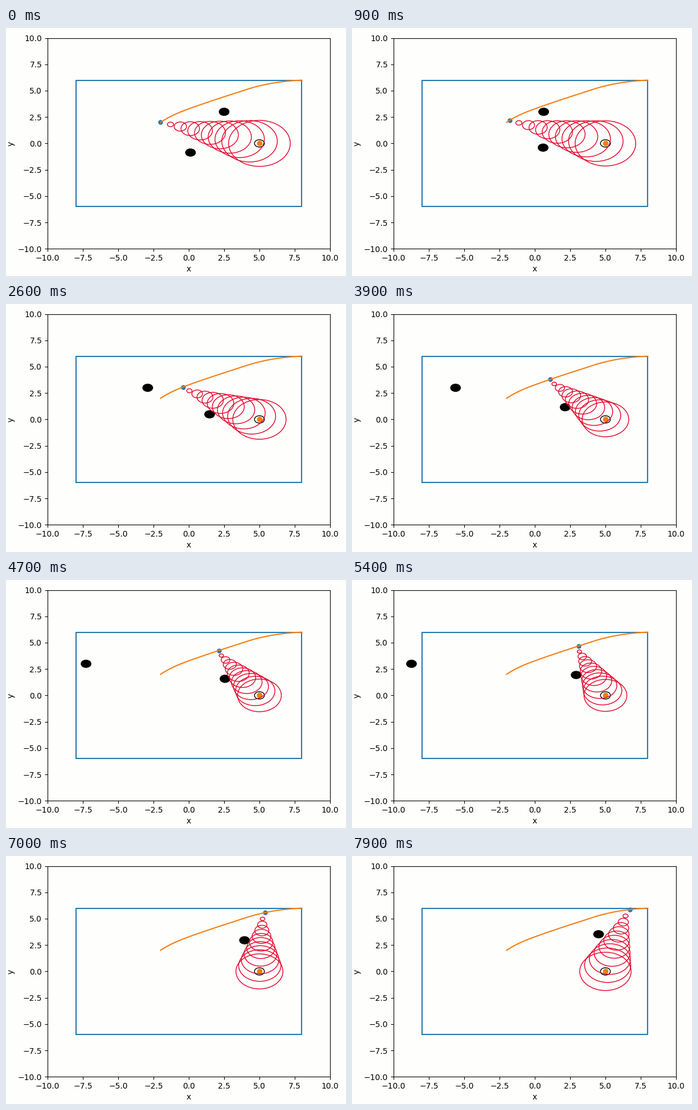
A matplotlib script for the animation above (8000 ms loop, 597 by 435 pixels).

```python
import numpy as np
import matplotlib.pyplot as plt
from matplotlib.animation import FuncAnimation
from matplotlib.patches import Circle

W, H, DPI = 597, 435, 100
FRAMES, INTERVAL = 80, 100
BLUE, ORANGE, RED, PAPER = "#2478ae", "#f57d12", "#e20024", "#fefefd"
GOAL = np.array([5.0, 0.0])
STEPS = np.arange(1, 11) / 10
CONE = 0.3               # ring radius per unit of distance
SPEED, LAG = 0.155, 23.5  # top speed per frame, time constant in frames

# waypoints of the path: x, y, slope
WAY_X = np.array([-2, 0, 4, 8])
WAY_Y = np.array([2, 3.28, 5.08, 6])
WAY_M = np.array([0.9, 0.49, 0.44, 0.05])


def path_y(x):
    """Cubic Hermite curve through the waypoints."""
    i = np.clip(np.searchsorted(WAY_X, x, side="right") - 1, 0, len(WAY_X) - 2)
    h = WAY_X[i + 1] - WAY_X[i]
    s = (x - WAY_X[i]) / h
    ends = WAY_Y[i] + (WAY_Y[i + 1] - WAY_Y[i]) * s * s * (3 - 2 * s)
    bend = WAY_M[i] * s * (1 - s) ** 2 - WAY_M[i + 1] * s * s * (1 - s)
    return ends + h * bend


def robot(n):
    """Speed rises to its limit with a first-order lag."""
    n = max(n, 0)
    x = -2 + SPEED * (n - LAG * (1 - np.exp(-n / LAG)))
    return np.array([x, path_y(x)])


def drift(n):
    """Steady drift that quickens near the end."""
    return 0.052 * n + 0.0115 * max(n - 54, 0)


fig = plt.figure(figsize=((W + 0.001) / DPI, (H + 0.001) / DPI), dpi=DPI,
                 facecolor=PAPER)
ax = fig.add_axes([73 / W, 47.799 / H, 496 / W, 369.603 / H], facecolor=PAPER)
ax.set(xlim=(-10, 10), ylim=(-10, 10), xlabel="x", ylabel="y")

ax.plot([-8, 8, 8, -8, -8], [-6, -6, 6, 6, -6], color=BLUE)
xs = np.linspace(-2, 8, 200)
ax.plot(xs, path_y(xs), color=ORANGE)

dot = ax.scatter([-2], [2], s=25, color=BLUE)
ax.scatter(*GOAL, s=36, color=ORANGE)
ax.add_patch(Circle(GOAL, 0.35, fill=False, ec="black", lw=1))
upper, lower = (ax.add_patch(Circle((0, 0), 0.35, color="black", lw=1))
                for _ in range(2))
rings = [ax.add_patch(Circle((0, 0), 1, fill=False, ec=RED, lw=1)) for _ in STEPS]


def update(n):
    dot.set_offsets([robot(n)])
    u = drift(n)
    upper.center = 2.5 - 4 * u, 3
    lower.center = 0.12 + u, -0.87 + u
    # the rings trail the dot by one step
    base = robot(n - 1)
    gap = GOAL - base
    for ring, k in zip(rings, STEPS):
        ring.center = tuple(base + k * gap)
        ring.set_radius(CONE * k * np.hypot(*gap))
    return [dot, upper, lower, *rings]


anim = FuncAnimation(fig, update, frames=FRAMES, interval=INTERVAL,
                     repeat=True, repeat_delay=0, blit=False)
plt.show()
```
